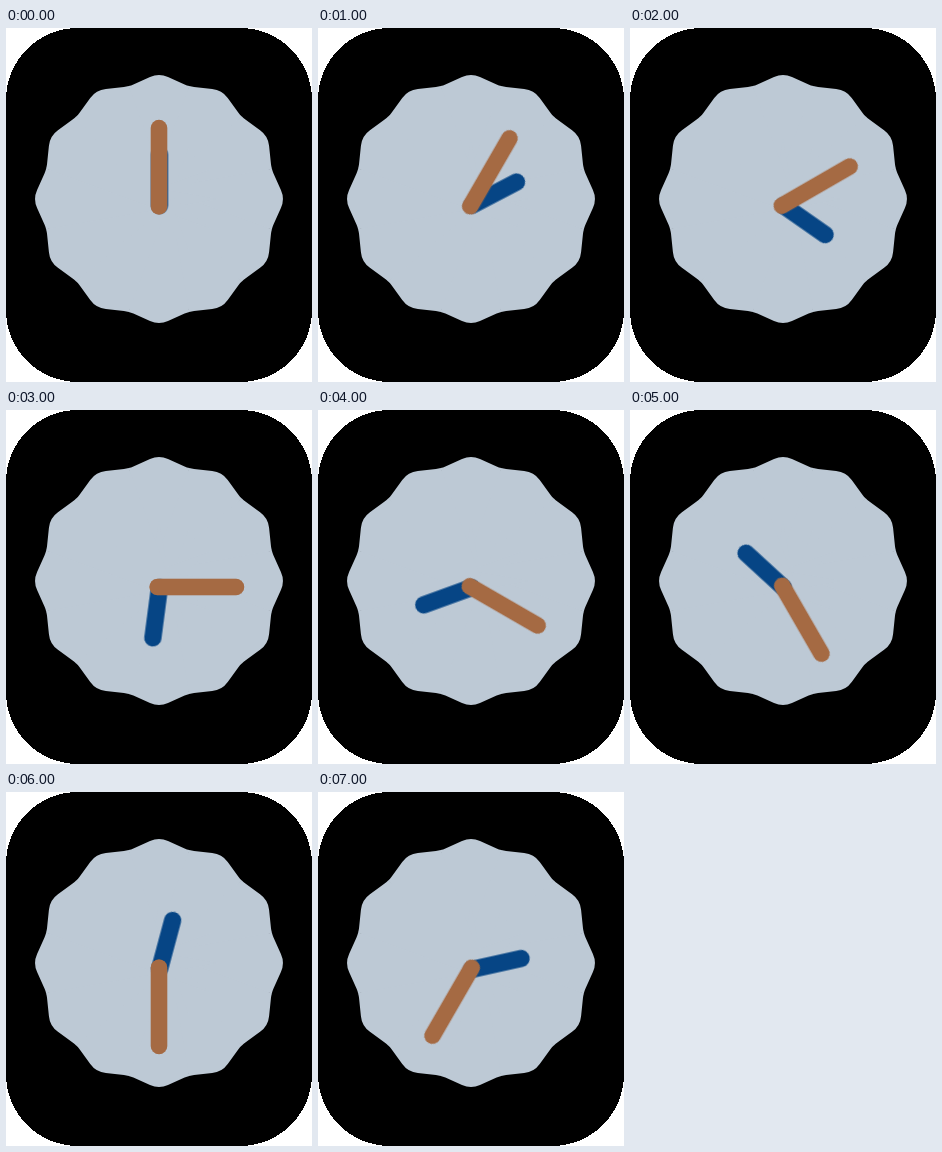
These frames come from a looping animation (306x354 px, 8000 ms). An HTML page without scripts:

```html
<!DOCTYPE html>
<html lang="en">
<head>
<meta charset="utf-8">
<title>Clock</title>
<style>
  html, body { margin: 0; width: 100%; height: 100%; overflow: hidden; background: #fff; }
  svg { display: block; width: 306px; height: 354px; }
  .case { shape-rendering: crispEdges; }
  .face { fill: #bdc9d5; }
  .hand { stroke-linecap: round; animation: turn 8s steps(8, end) infinite; }
  .hour { stroke: #064585; stroke-width: 17.2; --sweep: 500deg; }
  .minute { stroke: #a56a43; stroke-width: 16.6; --sweep: 240deg; }
  @keyframes turn { to { transform: rotate(var(--sweep)); } }
</style>
</head>
<body>
<svg viewBox="0 0 306 354">
  <defs>
    <path id="lobe" d="M-30.3-112.9Q-27.9-113.5-25.6-114.5L-9-121.9Q0-126 9-121.9L25.6-114.5Q27.9-113.5 30.3-112.9L0 60Z"/>
    <g id="quarter">
      <use href="#lobe"/>
      <use href="#lobe" transform="rotate(30)"/>
      <use href="#lobe" transform="rotate(60)"/>
    </g>
  </defs>
  <rect class="case" width="306" height="354" rx="72"/>
  <g class="face" transform="translate(153 171)">
    <use href="#quarter"/>
    <use href="#quarter" transform="rotate(90)"/>
    <use href="#quarter" transform="rotate(180)"/>
    <use href="#quarter" transform="rotate(270)"/>
  </g>
  <g transform="translate(153.5 177.5)">
    <path class="hand hour" d="M0 0V-51"/>
  </g>
  <g transform="translate(153 177)">
    <path class="hand minute" d="M0 1.5V-77"/>
  </g>
</svg>
</body>
</html>
```
